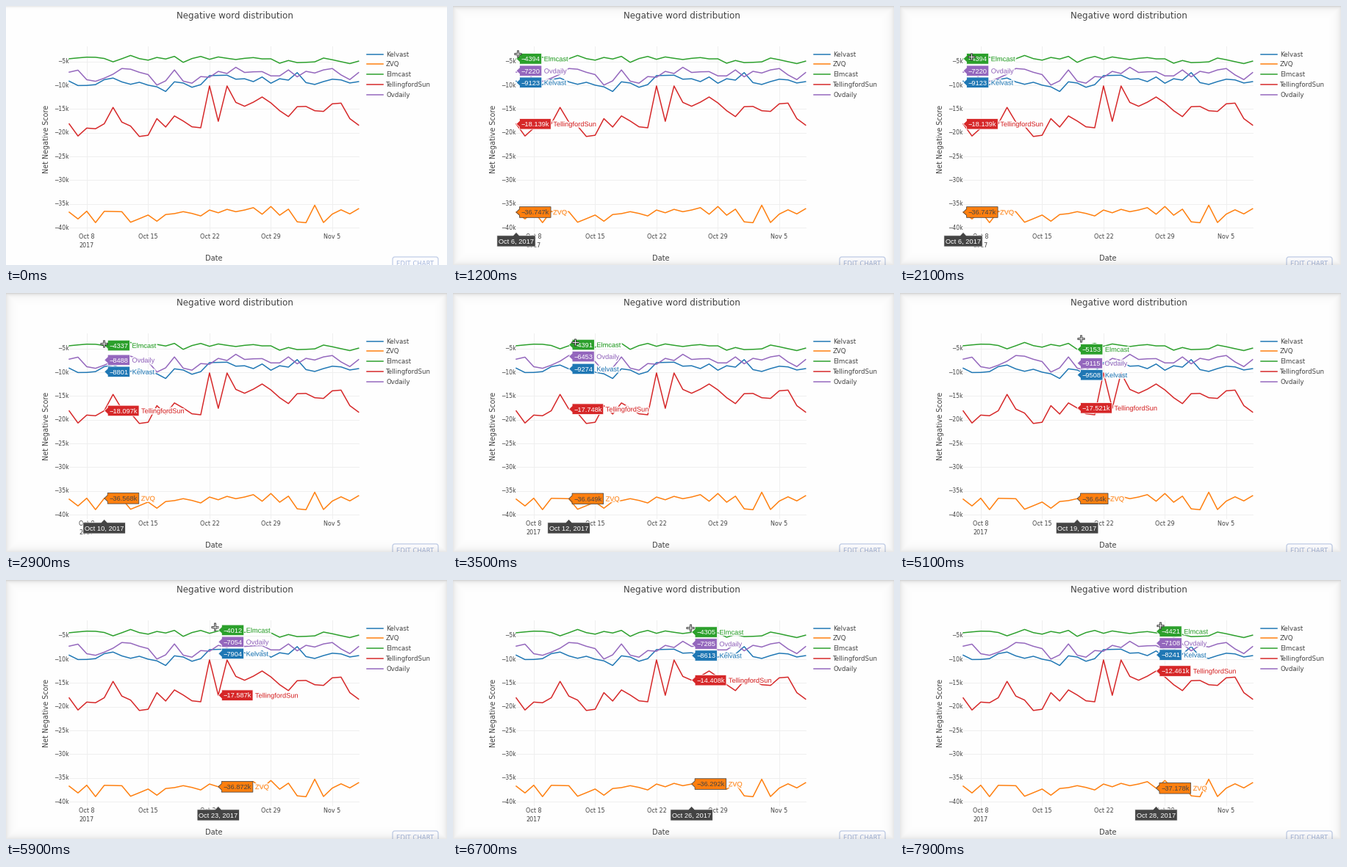
These frames come from a looping animation (600 by 353 pixels, 8 s). A matplotlib script:

```python
import matplotlib.pyplot as plt
import numpy as np
from matplotlib.animation import FuncAnimation
from matplotlib.patheffects import Normal, Stroke

W, H, DPI = 600, 353, 100
STEP, FRAMES = 100, 80
PT = 72 / DPI
INK = "#444444"
HOVER_FONT = "Liberation Sans"
HOVER_SIZE = 9.25
LABEL_GAP = 16

# Daily scores from Oct 6 to Nov 8, sign dropped
kelvast = [9123, 10041, 10023, 9847, 8801, 8463, 9274, 9781, 9352, 9962, 10316, 11294,
           9257, 9508, 10408, 9853, 7951, 7904, 7862, 8703, 8613, 9214, 8241, 9553,
           8612, 8897, 7316, 9421, 9814, 9207, 8709, 8854, 9503, 9218]
zvq = [36747, 38174, 36542, 38947, 36568, 36603, 36649, 38872, 38124, 37351, 38653, 37243,
       37052, 36640, 37013, 37541, 36297, 36872, 36153, 36648, 36292, 35794, 37178, 35553,
       37387, 36112, 38786, 38968, 35281, 38927, 37154, 36248, 37112, 36021]
elmcast = [4394, 4213, 4057, 4083, 4337, 5042, 4391, 3698, 4369, 4691, 4117, 4446,
           3893, 5153, 4352, 3907, 4513, 4012, 4298, 4556, 4305, 4147, 4421, 4409,
           5337, 4758, 5208, 5149, 5053, 4247, 4602, 5011, 5414, 4896]
tellingford = [18139, 20687, 19014, 19157, 18097, 14652, 17748, 18593, 20784, 20526, 17023, 18794,
               16453, 17521, 18747, 18952, 10118, 17587, 10134, 13596, 14408, 13552, 12461, 13704,
               15347, 16592, 14503, 14448, 15354, 15497, 13897, 13751, 17018, 18384]
ovdaily = [7220, 6797, 8812, 9148, 8488, 7652, 6453, 6597, 7248, 7732, 9941, 9053,
           6752, 9115, 9547, 8152, 8297, 7054, 7503, 6197, 7285, 7148, 7108, 8007,
           8012, 6752, 8203, 7047, 7398, 6749, 6453, 7804, 8787, 7312]

SERIES = [
    ("Kelvast", "#1f77b4", kelvast),
    ("ZVQ", "#ff7f0e", zvq),
    ("Elmcast", "#2ca02c", elmcast),
    ("TellingfordSun", "#d62728", tellingford),
    ("Ovdaily", "#9467bd", ovdaily),
]

# Pointer path (ms, x, y) and hovered day (ms, day)
POINTER = np.array([
    (400, 158, 5), (600, 66, 57), (800, 66, 57), (1000, 87, 64), (1900, 91, 69),
    (2100, 97, 69), (2900, 133, 69), (4200, 205, 65), (5100, 246, 62),
    (6700, 322.5, 65), (7100, 345, 64), (7900, 354, 62)])
HOVER = np.array([
    (1000, 0), (2200, 0), (2600, 2), (2900, 4), (4200, 9), (5100, 13), (5300, 14),
    (6200, 18), (6700, 20), (7100, 22), (7900, 22)])

fig = plt.figure(figsize=(W / DPI, H / DPI), dpi=DPI, facecolor="#fefefe")
ax = fig.add_axes([0, 0, 1, 1])
ax.set(xlim=(0, W), ylim=(H, 0))
ax.axis("off")


def day_x(day):
    return 86 + 11.93 * day


def score_y(score):
    return 43.5 + 6.463 * np.asarray(score) / 1000


def text(x, y, s, size, color=INK, ha="center", font="DejaVu Sans", z=5, **kw):
    return ax.text(x, y + 0.36 * size, s, fontsize=size * PT, color=color, ha=ha,
                   va="baseline", family=font, zorder=z, **kw)


def line(xs, ys, color, width, z=3, **kw):
    return ax.plot(xs, ys, color=color, lw=width * PT, zorder=z, **kw)[0]


def polygon(points, face, edge, z):
    return ax.add_patch(plt.Polygon(points, facecolor=face, edgecolor=edge,
                                    lw=0.8 * PT, zorder=z))


def score_label(score):
    return f"\u2212{score / 1000:g}k" if score >= 9950 else f"\u2212{score}"


def date_label(day):
    return f"Oct {day + 6}, 2017" if day < 26 else f"Nov {day - 25}, 2017"


def spread(ys):
    """Move sorted positions apart so that neighbours keep LABEL_GAP."""
    groups = []
    for i, y in enumerate(ys):
        groups.append([y - i * LABEL_GAP])
        while len(groups) > 1 and np.mean(groups[-2]) > np.mean(groups[-1]):
            last = groups.pop()
            groups[-1] += last
    flat = [np.mean(g) for g in groups for _ in g]
    return [y + i * LABEL_GAP for i, y in enumerate(flat)]


def draw_chart():
    for day, name in ((2, "Oct 8"), (9, "Oct 15"), (16, "Oct 22"), (23, "Oct 29"), (30, "Nov 5")):
        x = day_x(day)
        line([x, x], [55, 307], "#eeeeee", 0.9, z=1)
        text(x, 314.3, name, 8.05)
    text(day_x(2), 326, "2017", 8.05)
    for k in range(5, 41, 5):
        y = score_y(k * 1000)
        line([86, 480], [y, y], "#eeeeee", 0.9, z=1)
        text(85.5, y - 0.2, f"\u2212{k}k", 7.6, ha="right")

    for i, (name, color, scores) in enumerate(SERIES):
        line(day_x(np.arange(len(scores))), score_y(scores), color, 1.5, solid_joinstyle="round")
        y = 65.5 + 13.85 * i
        line([490.5, 512.5], [y, y], color, 1.5)
        text(517, y, name, 8.6, ha="left")

    text(311, 13, "Negative word distribution", 11.9)
    text(283, 343, "Date", 9.8)
    ax.text(54.5, 181, "Net Negative Score", fontsize=9.6 * PT, color=INK, rotation=90,
            ha="center", va="center", family="DejaVu Sans")

    ax.add_patch(plt.matplotlib.patches.FancyBboxPatch(
        (528, 344), 58, 16, boxstyle="round,pad=2,rounding_size=3",
        facecolor="#fdfdff", edgecolor="#b9c7e4", lw=1.1 * PT, zorder=4))
    text(557, 350.8, "EDIT CHART", 8.5, "#a3b5da")


def shade_layer(alpha):
    rgba = np.zeros((H, W, 4))
    rgba[..., 3] = alpha
    return ax.imshow(rgba, extent=(0, W, H, 0), aspect="auto", zorder=20, interpolation="nearest")


def draw_shades():
    yy, xx = np.mgrid[:H, :W]
    shade_layer(0.08 * np.exp(-yy / 1.5))
    edge = np.minimum(np.minimum(xx, W - 1 - xx), np.minimum(yy, H - 1 - yy))
    return shade_layer(0.09 * np.exp(-edge / 5))


def hover_tag(x, y, label, name, color):
    dark = name == "ZVQ"
    value = text(x + 6.7, y, label, HOVER_SIZE, INK if dark else "white", "left", HOVER_FONT, z=12)
    left, right = x + 4.5, x + 8.8 + value.get_window_extent().width
    tag = polygon([(x, y), (left, y - 4.3), (left, y - 7.3), (right, y - 7.3),
                   (right, y + 7.3), (left, y + 7.3), (left, y + 4.3)],
                  color, INK if dark else "white", 11)
    halo = [Stroke(linewidth=3.6 * PT, foreground="white", alpha=0.85), Normal()]
    title = text(right + 3, y, name, HOVER_SIZE, color, "left", HOVER_FONT, z=10,
                 path_effects=halo)
    return [value, tag, title]


def date_tag(x, label):
    caption = text(x, 320.6, label, HOVER_SIZE, "white", font=HOVER_FONT, z=12)
    half = caption.get_window_extent().width / 2 + 2.2
    tag = polygon([(x, 308.3), (x + 4.3, 312.8), (x + half, 312.8), (x + half, 328),
                   (x - half, 328), (x - half, 312.8), (x - 4.3, 312.8)], INK, "white", 11)
    return [caption, tag]


def draw_hover(day):
    x = day_x(day)
    rows = sorted(SERIES, key=lambda s: s[2][day])
    ys = spread([score_y(s[2][day]) for s in rows])
    artists = date_tag(x, date_label(day))
    for y, (name, color, scores) in zip(ys, rows):
        artists += hover_tag(x, y, score_label(scores[day]), name, color)
    return artists


def draw_pointer(x, y):
    artists = []
    for color, width, reach, z in (("#333333", 2.8, 5.2, 14), ("white", 0.9, 4.3, 15)):
        artists.append(line([x - reach, x + reach], [y, y], color, width, z, solid_capstyle="butt"))
        artists.append(line([x, x], [y - reach, y + reach], color, width, z, solid_capstyle="butt"))
    return artists


draw_chart()
vignette = draw_shades()
ax.set(xlim=(0, W), ylim=(H, 0))
moving = []


def update(frame):
    t = frame * STEP
    while moving:
        moving.pop().remove()
    vignette.set_alpha(None if t >= 200 else t / 200)
    vignette.set_visible(t > 0)
    if t >= HOVER[0, 0]:
        moving.extend(draw_hover(int(round(np.interp(t, *HOVER.T)))))
    if t >= POINTER[0, 0]:
        times, xs, ys = POINTER.T
        moving.extend(draw_pointer(np.interp(t, times, xs), np.interp(t, times, ys)))
    return moving


anim = FuncAnimation(fig, update, frames=FRAMES, interval=STEP, init_func=lambda: [],
                     repeat=True, repeat_delay=0, blit=False)
plt.show()
```
